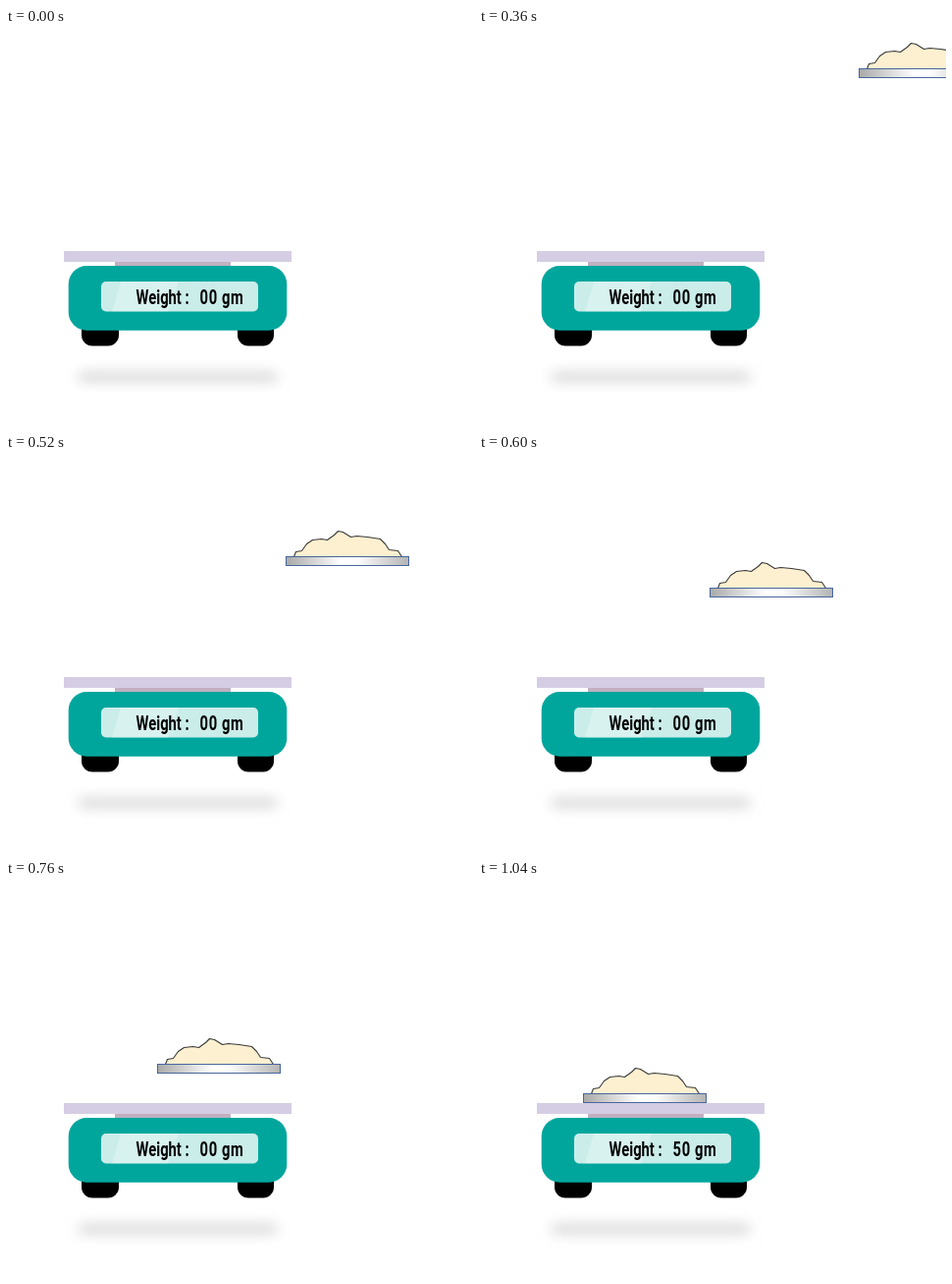
Write an HTML page that moves like this. It is 476 px wide and 405 px high and loops after 1610 ms.

```html
<!DOCTYPE html>
<html lang="en">
<head>
<meta charset="utf-8">
<title>Weighing scale</title>
<style>
  html, body { margin: 0; width: 100%; height: 100%; overflow: hidden; background: #fff; }
  svg { display: block; width: 476px; height: 405px; }
  text { font: bold 20px Roboto, "Liberation Sans", sans-serif; }
  #grams { letter-spacing: .8px; }
</style>
</head>
<body>
<svg viewBox="0 0 476 405">
  <defs>
    <linearGradient id="metal">
      <stop offset="0" stop-color="#a9a9a9"/>
      <stop offset=".45" stop-color="#fff"/>
      <stop offset=".6" stop-color="#fafafa"/>
      <stop offset="1" stop-color="#b4b4b4"/>
    </linearGradient>
    <filter id="blur" x="-20%" y="-200%" width="140%" height="500%">
      <feGaussianBlur stdDeviation="7 6"/>
    </filter>
  </defs>

  <!-- scale -->
  <rect x="73" y="348" width="204" height="14" rx="7" fill="#e2e2e2" filter="url(#blur)"/>
  <rect x="77" y="294" width="38" height="29.5" rx="11"/>
  <rect x="236" y="294" width="37" height="29.5" rx="11"/>
  <rect x="111" y="237" width="118" height="6" fill="#c0b0c0"/>
  <rect x="59" y="227" width="232" height="11" fill="#d5cde4"/>
  <rect x="63.7" y="242" width="222.6" height="65.7" rx="18.5" fill="#00a69c"/>
  <rect x="97" y="258" width="160" height="30.5" rx="5" fill="#caedea"/>
  <path d="M117 258H176L165 288.5H108Z" fill="#fff" opacity=".25"/>

  <!-- condensed lettering -->
  <g transform="translate(132.5 281) scale(.74 1)">
    <text>Weight :</text>
    <text id="grams" x="88">00 gm</text>
  </g>

  <g id="plate">
    <path transform="translate(.5 .5)"
          d="M8 0 10-5 16-6 21-13 27-17 36-18 42-17 49-22 53-26 58-25 66-20 72-21 83-20 96-18 101-13 105-7 114-6 118 0Z"
          fill="#fdf0d0" stroke="#3a3a3a" stroke-width="1.1" stroke-linejoin="round"/>
    <rect x=".5" y=".5" width="125" height="9" fill="url(#metal)" stroke="#48669c"/>
  </g>
</svg>
<script>
  const LOOP = 1610, STEP = 40, START = 200, LANDED = 1040;
  const plate = document.getElementById("plate");
  const grams = document.getElementById("grams");

  // Horizontal distance left to travel: steady glide, then a soft landing.
  function distance(t) {
    const left = Math.max(0, 1050 - t);
    return left > 450 ? 129 + .633 * (left - 450) : 129 * (left / 450) ** 2.24;
  }

  function draw(now) {
    const time = now % LOOP;
    const t = Math.min(LANDED, Math.floor(time / STEP) * STEP);
    const d = distance(t);
    const x = Math.floor(106.3 + d), y = Math.round(217 - .628 * d);
    plate.setAttribute("transform", `translate(${x} ${y})`);
    plate.setAttribute("visibility", t < START ? "hidden" : "visible");
    grams.textContent = t < LANDED ? "00 gm" : "50 gm";
  }

  const origin = performance.now();
  function tick() {
    draw(performance.now() - origin);
    requestAnimationFrame(tick);
  }
  tick();
</script>
</body>
</html>
```
